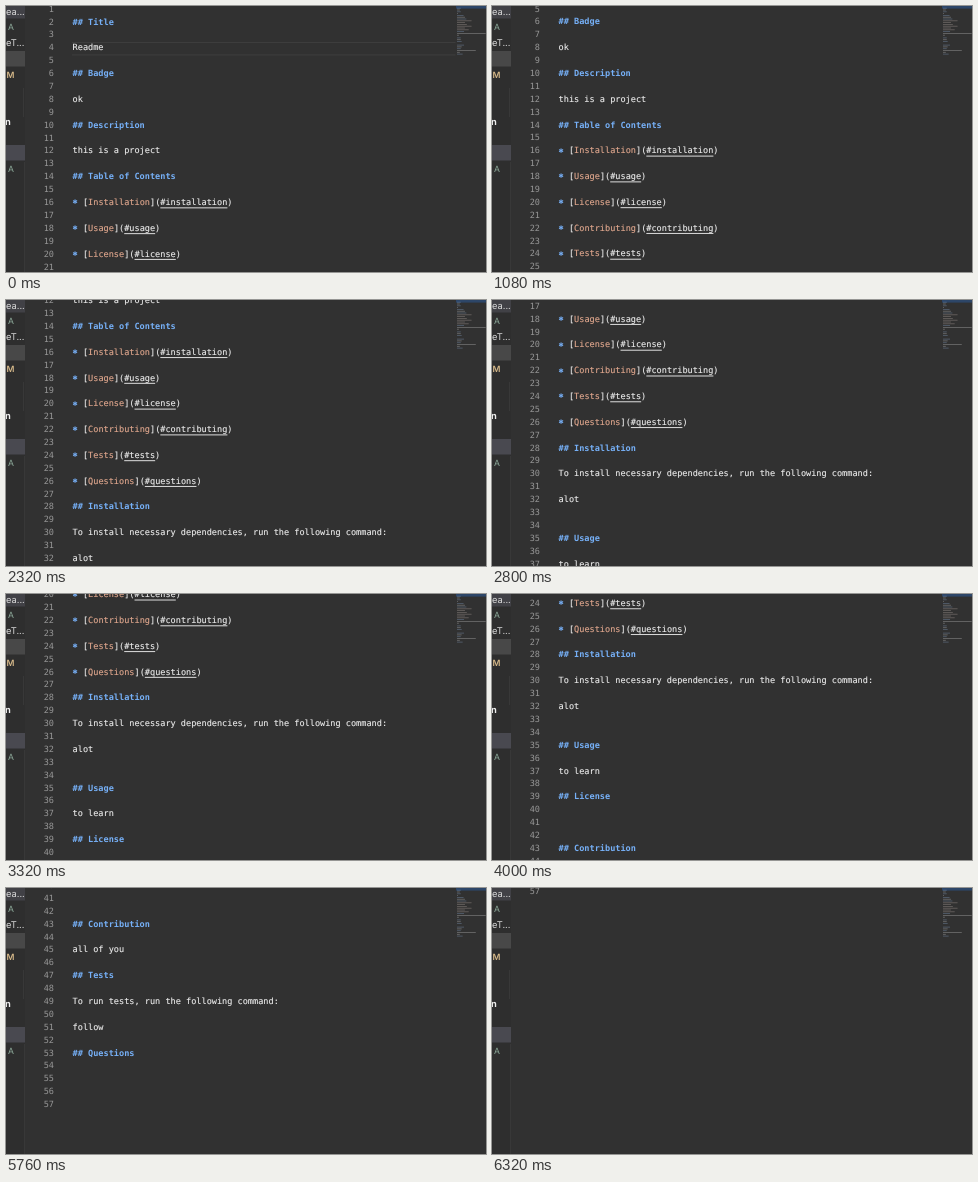
An HTML page that plays this animation: 480x266 px, repeating every 7.04 s.

```html
<!DOCTYPE html>
<html lang="en">
<head>
<meta charset="utf-8">
<title>Readme scroll</title>
<style>
  html, body { margin: 0; width: 100%; height: 100%; overflow: hidden; background: #313131; }
  svg { display: block; width: 100vw; height: 100vh; }
  text { white-space: pre; text-rendering: geometricPrecision; }
  #editor text { font: 8.57px "DejaVu Sans Mono", Menlo, monospace; fill: #efefef; stroke: #efefef; stroke-width: 0.12; }
  #editor .heading { font-weight: bold; fill: #76b0f7; stroke: none; }
  #editor .number { fill: #979797; stroke: none; text-anchor: end; }
  #editor .bullet { font-weight: bold; fill: #76aef4; stroke: #76aef4; stroke-width: 0.3; }
  #editor .label { fill: #e3a98f; stroke: #e3a98f; }
  #sidebar text { font: 9.3px Inter, "Open Sans", sans-serif; fill: #d8d8d8; }
  #sidebar .added { font-size: 8.6px; fill: #8fac9c; }
  #sidebar .modified { font-size: 8.6px; font-weight: 600; fill: #d6b98a; }
  #sidebar .folder { font-weight: 700; fill: #f0f0f0; }
</style>
</head>
<body>
<svg viewBox="0 0 480 266" preserveAspectRatio="none">
  <rect width="480" height="266" fill="#313131"/>
  <g id="editor"></g>
  <g id="minimap"></g>
  <g id="sidebar">
    <rect width="19" height="266" fill="#2e2e2e"/>
    <rect width="19" height="12.5" fill="#414146"/>
    <rect y="45" width="19" height="15.5" fill="#484848"/>
    <rect y="139" width="19" height="15.5" fill="#494950"/>
    <path d="M17.5 82V111M18.5 156V266" stroke="#383838" stroke-width="1"/>
    <text x="0" y="8.5">ea...</text>
    <text class="added" x="2" y="24.2">A</text>
    <text x="0" y="40">eT...</text>
    <text class="modified" x="0.6" y="71.5">M</text>
    <text class="folder" x="-0.9" y="118.5">n</text>
    <text class="added" x="2" y="165.5">A</text>
  </g>
</svg>
<script>
const LOOP = 7040, STEP = 40;
const PITCH = 12.89, FIRST_Y = 3.1, LEFT = 66.6, CHAR = 5.16, LAST_LINE = 57;
const BASELINE = 2.6, UNDERLINE = 4.9;

const lines = {
  2: "## Title", 4: "Readme", 6: "## Badge", 8: "ok",
  10: "## Description", 12: "this is a project", 14: "## Table of Contents",
  16: "* Installation", 18: "* Usage", 20: "* License",
  22: "* Contributing", 24: "* Tests", 26: "* Questions",
  28: "## Installation",
  30: "To install necessary dependencies, run the following command:",
  32: "alot", 35: "## Usage", 37: "to learn", 39: "## License",
  43: "## Contribution", 45: "all of you", 47: "## Tests",
  49: "To run tests, run the following command:", 51: "follow", 53: "## Questions"
};

// [time in ms, scroll offset in px]
const scrollKeys = [
  [600, 0], [900, 38], [1280, 61], [1360, 62], [1880, 99.1], [2040, 112],
  [2800, 203.2], [3320, 247.4], [3600, 264], [3720, 266], [4560, 377.6],
  [4840, 416], [5040, 428], [5320, 428], [5760, 508.4], [6000, 533], [6320, 721.5]
];

function add(parent, tag, attrs, content) {
  const node = document.createElementNS("http://www.w3.org/2000/svg", tag);
  for (const key in attrs) node.setAttribute(key, attrs[key]);
  if (content) node.textContent = content;
  parent.appendChild(node);
  return node;
}

const editor = document.getElementById("editor");
const minimap = document.getElementById("minimap");
const column = n => LEFT + n * CHAR;

function drawLink(name, center) {
  const anchor = "#" + name.toLowerCase();
  const start = name.length + 5;
  const y = center + BASELINE;
  add(editor, "text", { x: LEFT, y: y + 1.4, class: "bullet" }, "*");
  add(editor, "text", { x: column(2), y }, "[");
  add(editor, "text", { x: column(3), y, class: "label" }, name);
  add(editor, "text", { x: column(start - 2), y }, "](" + anchor + ")");
  add(editor, "rect", {
    x: column(start), y: center + UNDERLINE, width: anchor.length * CHAR, height: 1, fill: "#dcdcdc"
  });
}

function drawMinimapRow(n, length, color) {
  add(minimap, "rect", {
    x: 451, y: n * 0.9, width: length * 0.47, height: 0.8, fill: color, opacity: 0.42
  });
}

function drawLine(n) {
  const center = FIRST_Y + (n - 1) * PITCH;
  const y = center + BASELINE;
  add(editor, "text", { x: 48, y, class: "number" }, String(n));
  const text = lines[n];
  if (!text) return;
  if (text.startsWith("* ")) {
    drawLink(text.slice(2), center);
    drawMinimapRow(n, text.length * 2 + 3, "#b5a8a2");
    return;
  }
  const heading = text.startsWith("##");
  add(editor, "text", { x: LEFT, y, class: heading ? "heading" : "body" }, text);
  drawMinimapRow(n, text.length, heading ? "#86a3c8" : "#c4c4c4");
}

// Outline of the active line
add(editor, "path", {
  d: "M66 36.5H449.5M66 48.9H449.5", stroke: "#414141", "stroke-width": 0.8, fill: "none"
});
add(minimap, "rect", { x: 450, y: 0, width: 30, height: 2.6, fill: "#2d4668" });
for (let n = 1; n <= LAST_LINE; n++) drawLine(n);

const slopes = scrollKeys.slice(1).map(([t, s], i) =>
  (s - scrollKeys[i][1]) / (t - scrollKeys[i][0]));

// Harmonic mean of neighbouring slopes keeps the scroll from turning back
function tangent(i) {
  const a = slopes[i - 1] || 0, b = slopes[i] || 0;
  return a * b > 0 ? 2 * a * b / (a + b) : 0;
}

function scrollAt(time) {
  const last = scrollKeys.length - 1;
  if (time <= scrollKeys[0][0]) return 0;
  if (time >= scrollKeys[last][0]) return scrollKeys[last][1];
  const i = scrollKeys.findIndex(([t]) => t > time) - 1;
  const [t0, s0] = scrollKeys[i], [t1, s1] = scrollKeys[i + 1];
  const span = t1 - t0, u = (time - t0) / span, v = 1 - u;
  return s0 * (1 + 2 * u) * v * v + s1 * u * u * (3 - 2 * u)
    + span * u * v * (tangent(i) * v - tangent(i + 1) * u);
}

function render(now) {
  const time = Math.floor((now % LOOP) / STEP) * STEP;
  editor.setAttribute("transform", `translate(0 ${-scrollAt(time).toFixed(2)})`);
}

const start = performance.now();
function tick() {
  render(performance.now() - start);
  requestAnimationFrame(tick);
}
tick();
</script>
</body>
</html>
```
